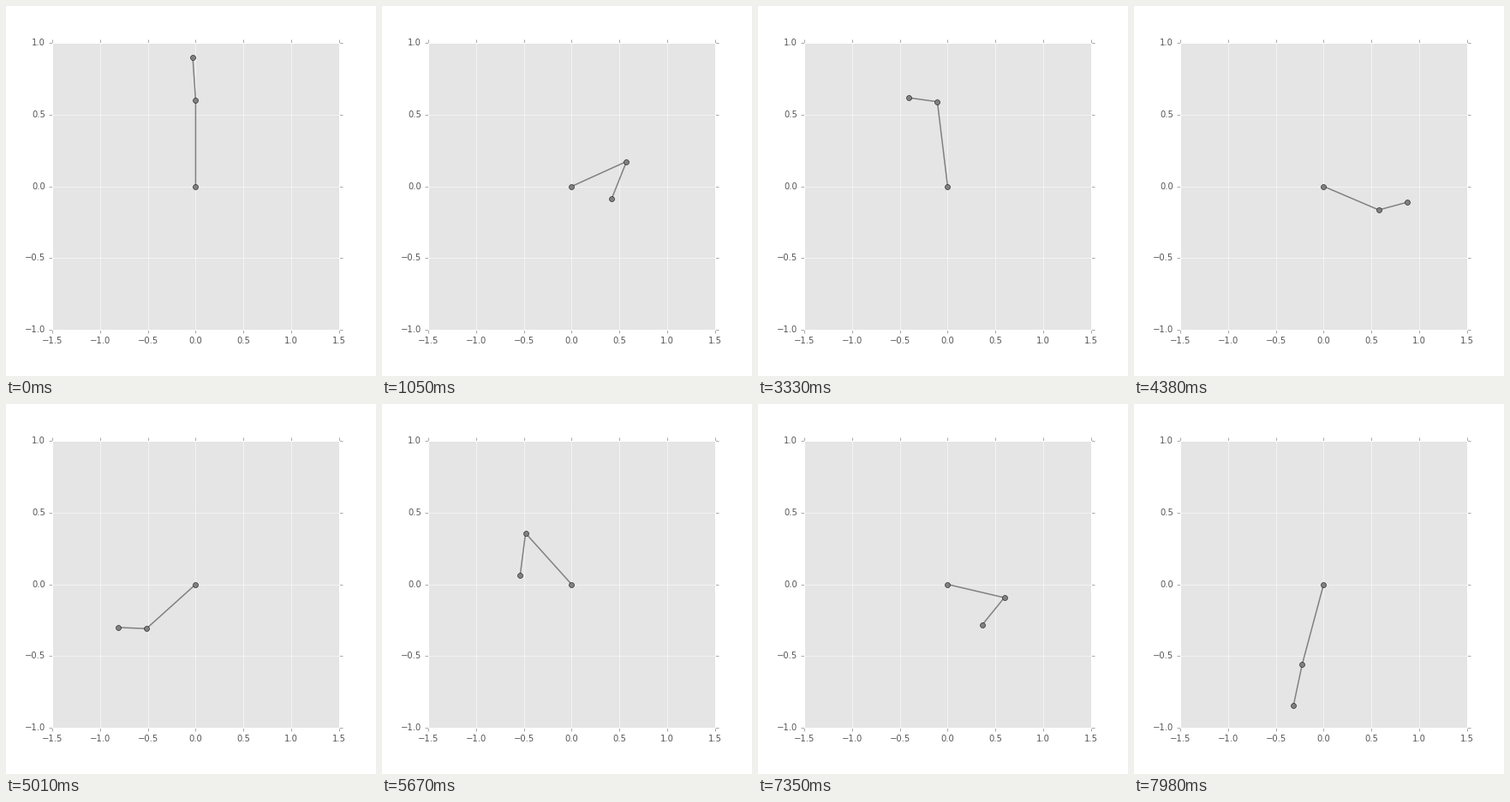
These frames come from a looping animation (432 px wide and 432 px high, 8000 ms). A matplotlib script:

```python
import numpy as np
import matplotlib.pyplot as plt
from matplotlib.animation import FuncAnimation

LOOP_MS, TICK_MS, STEP_MS = 8000, 20, 30
UPPER, LOWER = 0.6, 0.3          # arm lengths
INK = "#555555"

# The lower arm turns against the upper one. These are the moments (s) at which
# it has made another half turn, and the upper arm's angle from hanging down.
TIMES = np.array([0.25, 0.942, 1.61, 2.274, 2.88, 3.66, 4.268,
                  4.71, 5.14, 5.86, 6.628, 7.23, 7.945])
SWING = np.array([np.pi, 2.155, 0.49, -1.41, -2.56, -3.475, -4.74,
                  -6.15, -7.64, -8.83, -9.825, -10.78, -12.88])
HALVES = np.arange(len(TIMES))
BEND = np.pi * HALVES
BEND[0] = 0.1                    # the small lean that starts the fall


def glide(t, values, folded, straight):
    """Cubic curve through the values, fast when folded, slow when straight."""
    slopes = np.gradient(values, TIMES)
    slopes *= np.where(HALVES % 2, folded, straight)
    slopes[0] = 0
    t = max(t, TIMES[0])
    i = min(np.searchsorted(TIMES, t, side="right"), len(TIMES) - 1) - 1
    span = TIMES[i + 1] - TIMES[i]
    u = (t - TIMES[i]) / span
    blend = u * u * (3 - 2 * u)
    return (values[i] + blend * (values[i + 1] - values[i])
            + span * u * (1 - u) * ((1 - u) * slopes[i] - u * slopes[i + 1]))


def joints(t):
    """Pivot, elbow and tip positions at time t."""
    upper = glide(t, SWING, folded=1.35, straight=0.7)
    lower = upper + glide(t, BEND, folded=1.6, straight=0.5)
    dx = [0, UPPER * np.sin(upper), LOWER * np.sin(lower)]
    dy = [0, -UPPER * np.cos(upper), -LOWER * np.cos(lower)]
    return np.cumsum(dx), np.cumsum(dy)


def style_axes(ax):
    ax.set_xlim(-1.5, 1.5)
    ax.set_ylim(-1, 1)
    ax.set_xticks(np.arange(-1.5, 1.6, 0.5))
    ax.set_yticks(np.arange(-1, 1.1, 0.5))
    ax.set_facecolor("#E5E5E5")
    ax.set_axisbelow(True)
    ax.grid(color="white", linestyle="-", linewidth=0.5)
    ax.tick_params(direction="out", length=4, width=0.5, pad=4, color=INK,
                   labelcolor=INK, labelsize=10, top=True, right=True)
    for spine in ax.spines.values():
        spine.set_edgecolor("white")
        spine.set_linewidth(1)


plt.rcParams["font.family"] = "DejaVu Sans"
plt.rcParams["ytick.alignment"] = "center"
fig = plt.figure(figsize=(6, 6), dpi=72, facecolor="white")
ax = fig.add_axes([0.125, 0.125, 0.775, 0.775])
style_axes(ax)
arm, = ax.plot([], [], "o-", color="#808080", linewidth=1.5, markersize=6,
               markeredgecolor="black", markeredgewidth=0.5)


def draw(frame):
    # The pose advances every STEP_MS, independent of the frame tick.
    step = (frame * TICK_MS + TICK_MS // 2) // STEP_MS
    arm.set_data(*joints(step * STEP_MS / 1000))
    return arm,


anim = FuncAnimation(fig, draw, frames=LOOP_MS // TICK_MS, interval=TICK_MS,
                     init_func=lambda: draw(0), repeat=True, repeat_delay=0)
plt.show()
```
